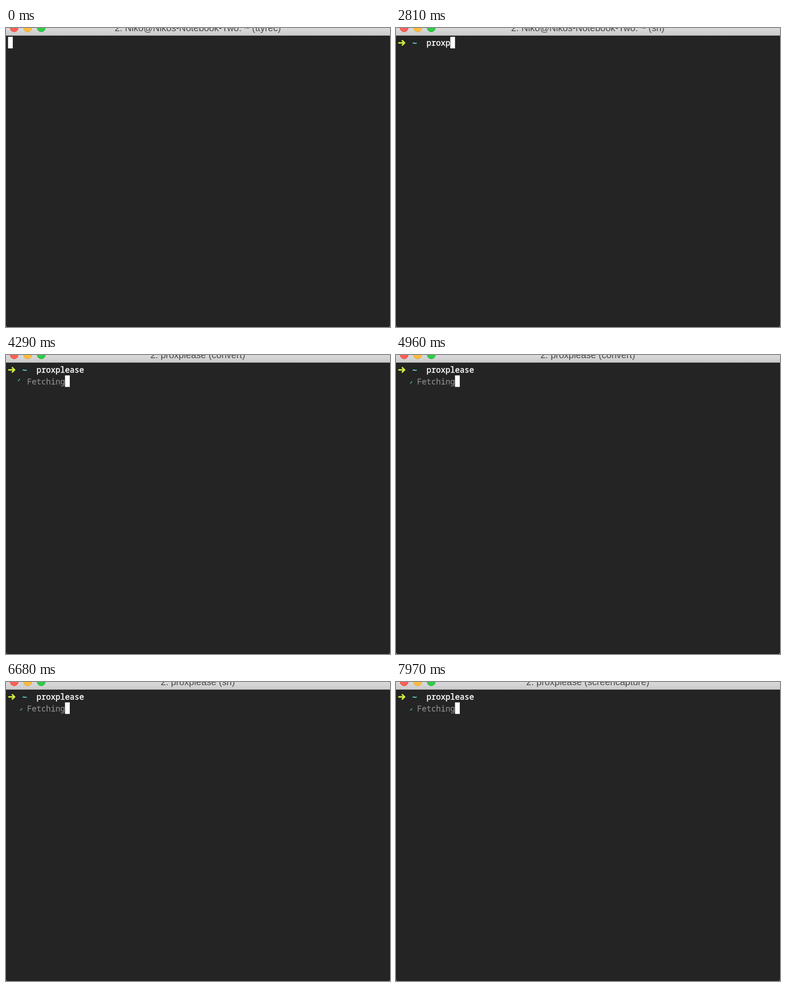
Write an HTML page that moves like this. It is 849 px wide and 660 px high and loops after 8000 ms.

```html
<!DOCTYPE html>
<html lang="en">
<head>
<meta charset="utf-8">
<title>Terminal</title>
<style>
  html, body { margin: 0; width: 100%; height: 100%; overflow: hidden; background: #242424; }
  svg { display: block; width: 849px; height: 660px; }
  text { white-space: pre; }
  .title { font: 20.5px "Liberation Sans", Arial, sans-serif; fill: #484848; text-anchor: middle; }
  .mono { font: 17.5px "Noto Sans Mono", "DejaVu Sans Mono", monospace; fill: #fff; stroke: #fff; stroke-width: 0.5; }
  .mono.tilde { font: bold 17.5px "DejaVu Sans Mono", monospace; fill: #66e0e0; stroke: none; }
  .mono.dim { fill: #8b8b8b; stroke: #8b8b8b; stroke-width: 0.25; }
  .line { fill: none; stroke-linejoin: round; }
</style>
</head>
<body>
<svg viewBox="0 0 849 660">
  <defs>
    <linearGradient id="bar" x1="0" y1="0" x2="0" y2="1">
      <stop offset="0" stop-color="#dadada"/>
      <stop offset="1" stop-color="#cbcbcb"/>
    </linearGradient>
  </defs>
  <rect width="849" height="660" fill="#242424"/>
  <path d="M0 657v3h3q-3 0-3-3zM849 657v3h-3q3 0 3-3z" fill="#ddd"/>
  <rect width="849" height="16" fill="url(#bar)"/>
  <rect y="16" width="849" height="1" fill="#a4a4a4"/>
  <g stroke-width="1">
    <circle cx="18" cy="-0.5" r="9" fill="#ff5f57" stroke="#e2463f"/>
    <circle cx="48" cy="-0.5" r="9" fill="#ffbd3c" stroke="#e1a032"/>
    <circle cx="78" cy="-0.5" r="9" fill="#2dcd45" stroke="#1fae34"/>
  </g>
  <text id="title" class="title" x="424" y="7.2"></text>
  <g id="prompt">
    <path class="line" d="M6.2 32.8H18M14 28L19 32.8L14 37.6" stroke="#d2f03c" stroke-width="3.2" stroke-linecap="round"/>
    <text class="mono tilde" x="36" y="39">~</text>
    <text id="command" class="mono" x="67.5" y="39"></text>
  </g>
  <g id="fetch">
    <path id="arc" class="line" stroke="#62d9d6" stroke-width="1.4"/>
    <text class="mono dim" x="46.5" y="64.5">Fetching</text>
  </g>
  <rect id="cursor" width="10.5" height="25.5" fill="#fff"/>
</svg>
<script>
const LOOP = 8000;
const PROMPT = 100, ENTER = 3830, FETCH = 4290;
const COMMAND = "proxplease";
const KEYS = [1770, 2050, 2240, 2480, 2810, 3010, 3120, 3230, 3350, 3500];
const SHELL = "2. Niko@Nikos-Notebook-Two: ~ ";
const TASK = "2. proxplease ";

// [start, process shown in the title]
const TITLES = [
  [0, "ttyrec"], [200, "sh"], [2050, "convert"], [2810, "sh"], [3230, "convert"],
  [3930, "screencapture"], [4290, "convert"], [5250, "screencapture"], [6320, "sh"],
  [7110, "screencapture"], [7400, "convert"], [7750, "screencapture"]
];

// [time, spinner step], evenly spaced in between
const BEATS = [[4290, 0], [5110, 11], [5960, 23], [6830, 35], [7680, 47], [7970, 51], [8042, 52]];

// Start and end angle of each spinner pose
const ARCS = [[180, 270], [180, 360], [270, 360], [0, 90], [0, 180], [90, 180]];

const el = id => document.getElementById(id);
const [title, prompt, command, fetching, arc, cursor] =
  ["title", "prompt", "command", "fetch", "arc", "cursor"].map(el);

const lastAt = (table, t) => table.findLastIndex(row => row[0] <= t);
const show = (node, on) => node.setAttribute("visibility", on ? "visible" : "hidden");

function setText(node, value) {
  if (node.textContent !== value) node.textContent = value;
}

function spinnerStep(t) {
  const i = lastAt(BEATS, t);
  const [t0, n0] = BEATS[i], [t1, n1] = BEATS[i + 1];
  const gap = (t1 - t0) / (n1 - n0);
  let n = 0;
  while (n0 + n + 1 < n1 && Math.floor((t0 + (n + 1) * gap) / 10) * 10 <= t) n++;
  return n0 + n;
}

function arcPath([from, to]) {
  const point = deg => {
    const a = deg * Math.PI / 180;
    return `${31 + 4 * Math.cos(a)} ${58 + 4 * Math.sin(a)}`;
  };
  return `M${point(from)}A4 4 0 0 1 ${point(to)}`;
}

function moveCursor(col, row) {
  cursor.setAttribute("x", 4.5 + col * 10.5);
  cursor.setAttribute("y", 19.5 + row * 25.5);
}

function draw(t) {
  const typed = KEYS.filter(k => k <= t).length;
  const busy = t >= FETCH;
  setText(title, `${busy ? TASK : SHELL}(${TITLES[lastAt(TITLES, t)][1]})`);
  setText(command, COMMAND.slice(0, typed));
  show(prompt, t >= PROMPT);
  show(fetching, busy);
  if (busy) arc.setAttribute("d", arcPath(ARCS[spinnerStep(t) % ARCS.length]));

  if (busy) moveCursor(12, 1);
  else if (t >= ENTER) moveCursor(0, 1);
  else moveCursor(t >= PROMPT ? 6 + typed : 0, 0);
}

const start = performance.now();
function tick(now) {
  draw(Math.max(0, now - start) % LOOP);
  requestAnimationFrame(tick);
}
draw(0);
requestAnimationFrame(tick);
</script>
</body>
</html>
```
